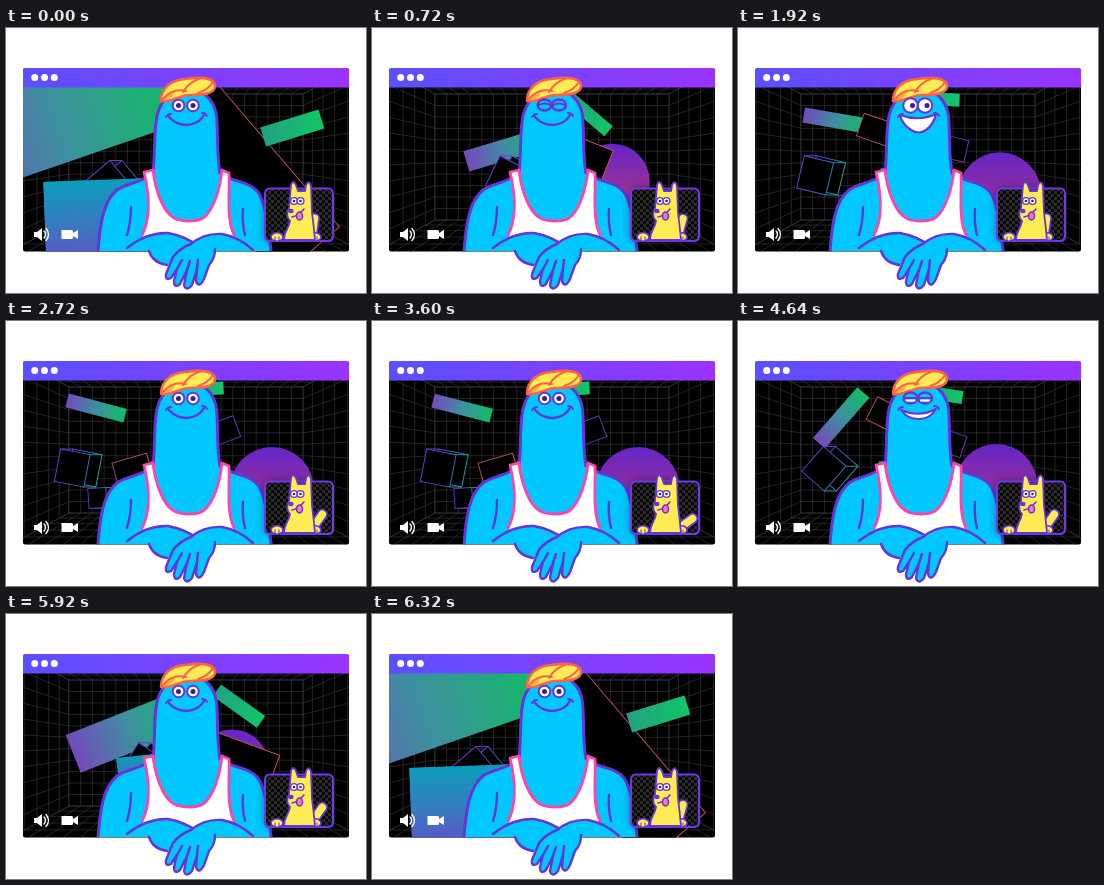
These frames come from a looping animation (360 px wide and 265 px high, 6400 ms). An HTML page with a canvas:

```html
<!DOCTYPE html>
<html lang="en">
<head>
<meta charset="utf-8">
<style>
html, body { margin: 0; width: 100%; height: 100%; overflow: hidden; background: #fff; }
canvas { display: block; }
</style>
</head>
<body>
<canvas id="stage" width="360" height="265"></canvas>
<script>
const ctx = document.getElementById('stage').getContext('2d');
const LOOP = 6400, STEP = 80;
const INK = '#6535d5', SKIN = '#00c8ff', YELLOW = '#ffec55', PINK = '#ff43aa', CORAL = '#ff6247';

const during = (time, from, to) => time >= from && time < to;
const mix = (a, b, p) => a.map((v, i) => v + (b[i] - v) * p);

function shape(d, fill, stroke, width = 2.4) {
  const path = new Path2D(d);
  if (fill) { ctx.fillStyle = fill; ctx.fill(path); }
  if (stroke) { ctx.strokeStyle = stroke; ctx.lineWidth = width; ctx.stroke(path); }
}

function disc(x, y, rx, fill, stroke, ry = rx, width = 2) {
  ctx.beginPath();
  ctx.ellipse(x, y, rx, ry, 0, 0, 7);
  if (fill) { ctx.fillStyle = fill; ctx.fill(); }
  if (stroke) { ctx.strokeStyle = stroke; ctx.lineWidth = width; ctx.stroke(); }
}

function blend(x0, y0, x1, y1, ...colors) {
  const g = ctx.createLinearGradient(x0, y0, x1, y1);
  colors.forEach((c, i) => g.addColorStop(i / (colors.length - 1), c));
  return g;
}

function clipped(path, draw) {
  ctx.save();
  ctx.clip(path);
  draw();
  ctx.restore();
}

function inPose([x, y, w, h, angle], draw) {
  ctx.save();
  ctx.translate(x, y);
  ctx.rotate(angle * Math.PI / 180);
  draw(w, h);
  ctx.restore();
}

function slab(pose, across, ...colors) {
  inPose(pose, (w, h) => {
    ctx.fillStyle = across ? blend(-w / 2, 0, w / 2, 0, ...colors) : blend(0, -h / 2, 0, h / 2, ...colors);
    ctx.fillRect(-w / 2, -h / 2, w, h);
  });
}

function wireBox(pose, depth, ...colors) {
  const a = -pose[4] * Math.PI / 180;
  const dx = depth * Math.cos(a), dy = depth * Math.sin(a);
  inPose(pose, (w, h) => {
    const x = w / 2, y = h / 2, ink = blend(-x, 0, x + depth, 0, ...colors);
    const face = (u, v) => `M${u - x} ${v - y}h${w}v${h}h${-w}z`;
    if (depth) {
      shape(face(dx, dy), '#000', ink, 1);
      for (const u of [-x, x]) for (const v of [-y, y]) shape(`M${u} ${v}l${dx} ${dy}`, null, ink, 1);
    }
    shape(face(0, 0), '#000', ink, 1);
  });
}

function room() {
  const cx = 180, cy = 129, hw = 117, hh = 63;
  ctx.fillStyle = '#000';
  ctx.fillRect(17, 59, 326, 165);
  let d = '';
  for (let i = 0; i <= 20; i++) {
    const x = (i / 10 - 1) * hw;
    d += `M${cx + x} ${cy - hh}v${2 * hh}`;
    for (const s of [-hh, hh]) d += `M${cx + x} ${cy + s}L${cx + x * 1.6} ${cy + s * 1.6}`;
  }
  for (let i = 0; i <= 11; i++) {
    const y = (i / 5.5 - 1) * hh;
    d += `M${cx - hw} ${cy + y}h${2 * hw}`;
    for (const s of [-hw, hw]) d += `M${cx + s} ${cy + y}L${cx + s * 1.6} ${cy + y * 1.6}`;
  }
  for (const k of [1, 1.08, 1.17, 1.27, 1.38]) d += `M${cx - hw * k} ${cy - hh * k}h${2 * hw * k}v${2 * hh * k}h${-2 * hw * k}z`;
  shape(d, null, '#343434', 0.7);
}

// Shapes spread outwards and return once per loop, and rush at the viewer where it joins.
// A pose is x, y, width, height, degrees.
function floating(time) {
  const t = time + STEP / 2, phase = 2 * Math.PI * t / LOOP;
  const spread = Math.sin(Math.PI / 4 * (1 - Math.cos(phase)));
  const bob = Math.cos(2 * phase);
  const tumble = Math.exp(-(((t - 4640) / 450) ** 2));
  const rush = (0.5 + 0.5 * Math.cos(Math.PI * Math.min(1, Math.min(t, LOOP - t) / 720))) ** 1.5;
  const place = (near, home, out, rise = 0, turn = 0) => {
    const hover = mix(home, out, spread);
    hover[1] += rise;
    hover[4] += turn;
    return mix(hover, near, rush);
  };

  const [x, y, r] = mix(mix([233, 150, 37], [266, 168, 42], spread), [185, 160, 38], rush);
  disc(x, y, r, blend(0, y - r, 0, y + r, '#6624c9', '#8f2f9f', '#cc4468'));
  wireBox(place([180, 120, 34, 22, 0], [190, 115, 34, 22, -5], [215, 115, 34, 22, -5], -6 * bob, -24 * bob),
    0, '#4a2a9a', '#5b35b5');
  slab(place([42, 77, 260, 120, -19], [147, 130, 92, 23, -25], [90, 87, 60, 14, 15], 0, -55 * tumble),
    true, '#7549bd', '#3e8fa0', '#10bd62');
  wireBox(place([242, 153, 190, 80, 50], [236, 127, 50, 36, 30], [126, 127, 36, 22, -2], 32 * bob, -22 * bob),
    0, '#a34a5e', '#c9565a');
  slab(place([287, 100, 61, 20, -18], [222, 92, 54, 13, 52], [200, 68, 35, 13, -4]), true, '#22a184', '#10c766');
  slab(place([95, 198, 114, 92, -2], [143, 149, 30, 20, -8], [160, 150, 30, 20, 0]),
    false, '#0c9dbb', '#3a78c0', '#6a45c8');
  wireBox(place([200, 177, 18, 20, 0], [241, 177, 18, 20, 0], [91, 177, 18, 20, -4]), 6, '#5b35b5', '#218d8d');
  wireBox(place([100, 172, 56, 56, 50], [152, 150, 30, 33, 30], [66, 147, 30, 33, 11], 0, 26 * tumble),
    12, '#6a35d0', '#4355b0', '#219d9d');
  if (rush > 0.01) slab(place([95, 198, 114, 92, -2], [143, 149, 30, 20, -8], [160, 150, 30, 20, 0]),
    false, '#0c9dbb', '#3a78c0', '#6a45c8');
}

function windowFrame() {
  ctx.fillStyle = blend(17, 0, 343, 0, '#5a50ff', '#9a33ff');
  ctx.fillRect(17, 40, 326, 19.5);
  for (const x of [28.7, 38.5, 48.3]) disc(x, 49.4, 3.5, '#fff');
  shape('M28 204h3l5-4v13l-5-4h-3zM55.500 202h10q1.500 0 1.500 1.500v1.500l5-3v9l-5-3v1.500q0 1.500-1.500 1.500h-10z', '#fff');
  shape('M38 203q3 3 0 7M40 200.500q5 6 0 12', null, '#fff', 1.4);
}

function body() {
  const outline = 'M92 223C94 197 97 173 111 162C120 155 136 155 147 145C149 128 148 108 150 94C152 74 164 62 183 62C202 62 211 77 211 95C212 113 211 130 214 145C224 154 242 152 252 164C260 174 263 202 265 223';
  const vest = 'M136 207C145 190 143 165 138 144L147 142C149 160 156 183 168 190C176 194 190 194 197 190C208 182 214 160 216 142L223 145C224 165 220 190 228 207';
  shape(outline, SKIN, INK, 3);
  shape(vest + 'L215 217H146Z', '#fff');
  shape(vest, null, PINK, 2.8);
  shape('M125 179Q125 194 121 207M237 181Q236 195 239 207', null, INK);
}

function hands() {
  shape('M119 223Q140 204 162 205Q177 207 190 216L212 222L204 232L188 236L164 237Q149 236 143 223Z', SKIN);
  shape('M121 220Q141 204 162 205Q179 208 194 219M143 223Q147 235 161 237', null, INK);
  const hand = 'M247 222Q233 209 216 206Q198 205 185 216Q174 220 167 229L160 246Q159 253 165 250L171 241L168 253Q168 261 174 256L181 242L178 257Q180 264 186 257L191 241L190 253Q193 261 198 251L203 237Q209 231 209 221';
  shape(hand, SKIN, INK);
  shape('M171 241L176 232M181 242L184 233M191 241L192 232', null, INK);
}

function cap() {
  shape('M155 73C155 61 164 52 179 51C192 49 207 49 209 57C210 66 196 67 184 67C173 67 165 75 155 73Z', YELLOW, CORAL, 2.6);
  shape('M157 72Q161 64 170 62L166 69Q162 73 157 72Z', '#ffad45');
  shape('M157 71Q166 60 180 63M177 64Q183 54 193 51M192 65Q202 62 207 54', null, CORAL, 2);
}

function face(time) {
  const grin = during(time, 1520, 2480) || during(time, 5120, 5840);
  const shut = during(time, 640, 880);
  const sly = during(time, 4480, 4800);
  for (const x of [172.5, 187]) {
    if (shut || sly) {
      disc(x, 77, 7, SKIN, INK, 5.5, 2.4);
      shape(`M${x - 6} 77q6 ${sly ? 0 : -3} 12 0`, null, INK, 2.2);
      if (sly) shape(`M${x - 4} 79.500h8`, null, '#fff', 2);
    } else {
      disc(x, 77.5, grin ? 7.2 : 5.8, '#fff', INK);
      disc(x + (grin ? 2 : 0), 77.5, 2.5, '#33208f');
    }
  }
  if (grin) shape('M162 87Q181 94 198 86Q196 96 188 102Q181 107 173 102Q164 96 162 87Z', '#fff', INK, 2.2);
  else if (sly) shape('M163 89Q181 97 198 88Q192 98 181 98Q169 98 163 89Z', '#fff', INK, 2);
  else shape('M163 89Q170 97 181 97Q193 96 198 87', null, INK, 2.4);
  shape('M160 89q2-3 5-3M196 85q4 0 5 3', null, INK, 1.8);
}

function dogPane(time) {
  const pane = 'M264 160.500H322Q327 160.500 327 166V208Q327 213 322 213H264Q259 213 259 208V166Q259 160.500 264 160.500Z';
  ctx.shadowColor = 'rgba(0,0,60,.5)';
  ctx.shadowBlur = 10;
  shape(pane, '#080808');
  ctx.shadowBlur = 0;
  clipped(new Path2D(pane), () => {
    ctx.fillStyle = '#2b2b2b';
    for (let y = 0; y < 18; y++)
      for (let x = y % 2; x < 23; x += 2) ctx.fillRect(259 + x * 3, 160 + y * 3, 3, 3);
  });
  shape(pane, null, '#7138e8', 2);

  const wag = (-55 - 27 * Math.cos(20 * Math.PI * time / LOOP)) * Math.PI / 180;
  const tail = `M306 208l${18 * Math.cos(wag)} ${18 * Math.sin(wag)}`;
  shape(tail, null, INK, 11);
  shape(tail, null, YELLOW, 7.5);
  for (const x of [271, 309]) {
    disc(x, 209, 6, YELLOW, INK, 4.2, 1.6);
    shape(`M${x - 2} 209v4M${x + 2} 209v4`, null, INK, 1);
  }
  shape('M278 212C278 203 283 200 284 193Q279 188 283 180L285 157Q287 151 290 157L292 163H299L300 157Q303 151 305 158L306 185Q308 200 309 212Z', YELLOW, INK, 1.8);
  const blink = during(time, 5280, 5600);
  for (const x of [288, 294.5]) {
    disc(x, 173, 3.4, blink ? YELLOW : '#fff', INK, blink ? 2 : 3.4, 1.4);
    if (!blink) disc(x, 173, 1.3, '#33208f');
  }
  disc(285, 183, 2.6, INK, null, 2.2);
  shape('M286 189Q292 188 298 181', null, INK, 1.6);
  disc(293.5, 188, 3, '#ff75b9', INK, 4, 1.6);
}

function draw(time) {
  ctx.fillStyle = '#fff';
  ctx.fillRect(0, 0, 360, 265);
  ctx.lineCap = ctx.lineJoin = 'round';
  const frame = new Path2D(), upper = new Path2D();
  frame.roundRect(17, 40, 326, 183.5, 2);
  upper.rect(0, 0, 360, 223.5);
  clipped(frame, () => { room(); floating(time); windowFrame(); });
  clipped(upper, body);
  hands();
  cap();
  face(time);
  clipped(upper, () => dogPane(time));
}

function tick() {
  draw(Math.floor(performance.now() % LOOP / STEP) * STEP);
  requestAnimationFrame(tick);
}
tick();
</script>
</body>
</html>
```
